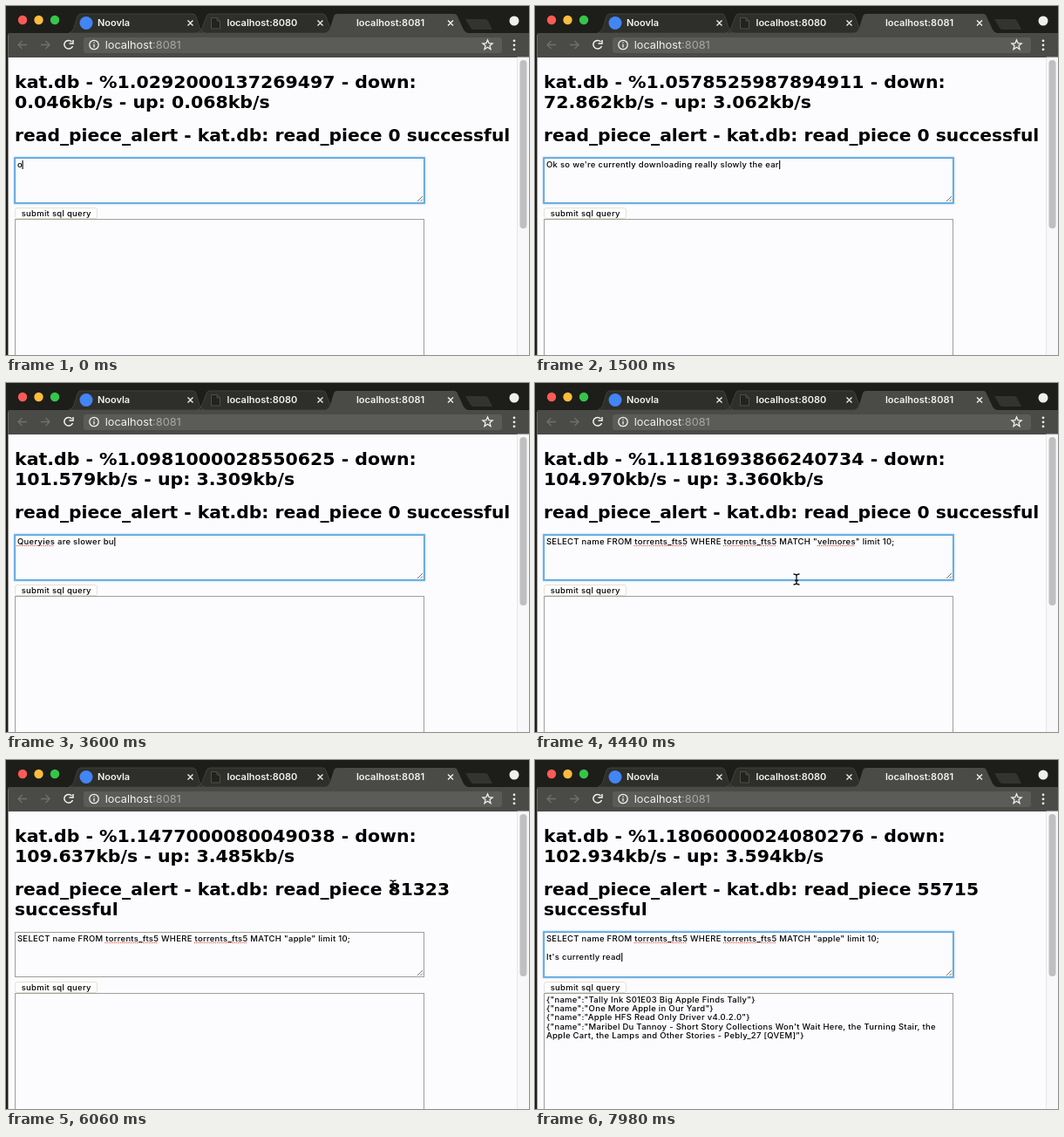
Recreate the animation shown at these times as an HTML page. Size 600 by 400 pixels, loop 8000 ms.

```html
<!DOCTYPE html>
<html lang="en">
<head>
<meta charset="utf-8">
<title>SQL over a partial download</title>
<style>
  html, body { margin: 0; width: 100%; height: 100%; overflow: hidden; background: #fcfbfe; }
  #stage { position: absolute; left: 0; top: 0; width: 600px; height: 400px; overflow: hidden; }
  svg, .layer { position: absolute; left: 0; top: 0; }
  svg text { font-family: Inter, Roboto, sans-serif; font-size: 10.1px; font-weight: 600; fill: #f4f4f2; }
  .wide { transform: scale(1.09, 1); transform-origin: 0 0; }
  h2, .small { position: absolute; margin: 0; left: 9.2px; white-space: pre; color: #000; }
  h2 { font: bold 18.8px/23px "DejaVu Sans", sans-serif; }
  #piece { top: 137px; font-size: 18.6px; }
  .small { font: 500 8.7px/10.2px Inter, Roboto, sans-serif; letter-spacing: .27px; }
  .box { position: absolute; left: 10px; width: 470px; box-sizing: border-box; background: #fcfbfe; border: 1px solid #a09f98; }
  #field { top: 174px; height: 52px; }
  #field.focus { border-color: #5ca3d8; box-shadow: 0 0 0 1px #7ab8e6, 0 0 2px 1px #a5d2f2; }
  #result { top: 244px; height: 200px; }
  #button { position: absolute; left: 10px; top: 231px; width: 95px; height: 13px; box-sizing: border-box;
            border: 1px solid #e3e2d4; border-radius: 3px; background: #fefefe; }
  .typo { text-decoration: underline dotted #d8452c 1.2px; text-underline-offset: 1px; text-decoration-skip-ink: none; }
  .picked { background: #a9d0f5; }
  .caret { display: inline-block; width: 1px; height: 10px; margin-right: -1px; background: #000; vertical-align: -2px; }
</style>
</head>
<body>
<div id="stage">
  <div class="layer" id="body">
    <div class="box" id="field"></div>
    <svg width="600" height="240" fill="none" stroke="#77766f"><path d="M472 224l6-6M475.500 224l2.500-2.500"/></svg>
    <div id="button"></div>
    <div class="box" id="result"></div>
    <div class="layer wide">
      <div class="small" id="typed" style="left:11.900px;top:177.200px"></div>
      <div class="small" style="left:16.200px;top:232.500px">submit sql query</div>
      <div class="small" id="rows" style="left:11.900px;top:247px"></div>
    </div>
  </div>
  <div class="layer wide">
    <h2 id="stats" style="top:76px"></h2>
    <h2 id="piece"></h2>
  </div>
  <svg width="600" height="400">
    <path fill="#1d1d1a" d="M0 0h600v33H0zM0 33h2.500v367H0z"/>
    <path fill="#2e2e2a" stroke="#4c4c46" stroke-width=".7" d="M72 31Q76 30 78 25L82 12Q83 9 86 9H214Q217 9 218 12L222 25Q224 30 228 31zM219 31Q223 30 225 25L230 12Q231 9 234 9H363Q366 9 367 12L372 25Q374 30 378 31z"/>
    <path fill="#33332f" d="M527 15h23q2 0 3 2l5 10h-22q-2 0-3-2z"/>
    <path fill="#4a4a47" d="M2.500 31H366Q370 30 372 25L376 12Q377 9 380 9H514Q517 9 518 12L524 25Q526 30 530 31H600V59H2.500z"/>
    <rect x="89" y="36" width="480" height="18" rx="3" fill="#5b5b58"/>
    <circle cx="19" cy="16" r="5.200" fill="#fb5b56"/>
    <circle cx="37.500" cy="16" r="5.200" fill="#fcbc3e"/>
    <circle cx="56" cy="16" r="5.200" fill="#35c649"/>
    <circle cx="92" cy="19.500" r="7.500" fill="#4285f4"/>
    <circle cx="583" cy="17" r="5.500" fill="#efefec"/>
    <path d="M235.500 13.500h6.500l3.500 3.500v9h-10zM242 13.500v3.500h3.500" fill="#22221f" stroke="#4f4f49"/>
    <g fill="none" stroke="#f1f1ee" stroke-width="1.300">
      <path d="M208.500 16.500l6 6m0-6l-6 6M357.500 16.500l6 6m0-6l-6 6M507 16.500l6 6m0-6l-6 6"/>
      <path d="M24 44.500H14m4.500-4.500l-4.500 4.500 4.500 4.500M40 44.500H50m-4.500-4.500l4.500 4.500-4.500 4.500" stroke="#6f6f6b"/>
      <path d="M75.500 41a5 4.800 0 1 0 1 5M77 39v4h-4.500" stroke-width="1.500"/>
      <circle cx="101" cy="44.500" r="5.200"/>
      <path d="M101 43.800v3.700M101 41.300v1.300"/>
      <path d="M552.500 39l1.600 3.700 4 .3-3.100 2.600 1 3.900-3.500-2.200-3.500 2.200 1-3.900-3.100-2.600 4-.3z"/>
    </g>
    <g fill="#f1f1ee"><circle cx="583" cy="39.800" r="1.400"/><circle cx="583" cy="44.800" r="1.400"/><circle cx="583" cy="49.800" r="1.400"/></g>
    <g transform="scale(1.090 1)">
      <text x="96.300" y="23">Noovla</text>
      <text x="232.600" y="23">localhost:8080</text>
      <text x="368.800" y="23">localhost:8081</text>
      <text x="104.300" y="49" style="font-size:11.700px;font-weight:400">localhost<tspan fill="#a9a9a5">:8081</tspan></text>
    </g>
    <path fill="#f8f7f9" stroke="#e6e5e8" d="M586.500 59H601V401H586.500z"/>
    <rect id="thumb" x="589.500" y="62" width="8" rx="4" fill="#c0bfc0"/>
    <g id="mouse">
      <path id="beam" fill="none" stroke="#111" stroke-width="1.300" d="M-3.500-6Q0-6 0-4Q0-6 3.500-6M0-4V4M-3.500 6Q0 6 0 4Q0 6 3.500 6M-2 1.500H2"/>
      <path id="arrow" fill="#111" stroke="#fff" stroke-width=".8" d="M0 0V12L3 9.500 5 13.500 7 12.500 5 8.500H9z"/>
    </g>
  </svg>
</div>
<script>
const $ = id => document.getElementById(id);
const LOOP = 8000, TICK = 30, REFRESH = 330;

const intro = "Ok so we're currently downloading really slowly the earlier kat.db file. We only have 1% of it so far";
const slow = 'Queryies are slower but still work';
const open = 'SELECT name FROM torrents_fts5 WHERE torrents_fts5 MATCH "', close = '" limit 10;';
const first = open + 'velmores' + close;
const second = open + 'apple' + close;
const note = second + "\n\nIt's currently reading";

// time, text, characters typed, text after the caret
const typing = [
  [0, 'o', 1], [60, intro, 0], [660, intro, 27], [2370, intro, 86], [2790, intro, intro.length],
  [2970, slow, 0], [3600, slow, 22], [3960, slow, slow.length],
  [4230, '', 0], [4290, first, first.length],
  [5250, open + 'apple', open.length, close], [5460, open + 'apple', open.length + 5, close],
  [7380, note, second.length], [7980, note, second.length + 21]
];
// time, percent, down, up
const stats = [
  [0, 1.0292000137269497, .046, .068], [480, 1.0394999757409096, 45.359, 2.943],
  [2190, 1.0711999610066414, 92.865, 3.149], [3450, 1.0981000028550625, 101.579, 3.309],
  [4920, 1.1278999969363213, 106.614, 3.385], [5910, 1.1477000080049038, 109.637, 3.485],
  [7830, 1.1806000024080276, 102.934, 3.594]
];
const pieces = [[0, 0], [5880, 81323], [7020, 55715]];
const path = [
  [4440, 300, 225], [4800, 341, 183], [5520, 341, 183], [5760, 57, 237], [5820, 57, 237],
  [6060, 444, 144], [6700, 444, 150], [7050, 430, 212], [7380, 430, 212]
];
const rows = `{"name":"Tally Ink S01E03 Big Apple Finds Tally"}
{"name":"One More Apple in Our Yard"}
{"name":"Apple HFS Read Only Driver v4.0.2.0"}
{"name":"Maribel Du Tannoy - Short Story Collections Won't Wait Here, the Turning Stair, the
Apple Cart, the Lamps and Other Stories - Pebly_27 [QVEM]"}`;

const within = (t, a, b) => t >= a && t < b;
const show = (el, on) => el.style.display = on ? '' : 'none';

function locate(table, t) {
  let i = table.length - 1;
  while (i > 0 && table[i][0] > t) i--;
  return [table[i], table[i + 1] || table[i]];
}
function mix(table, t, at = t) {
  const [a, b] = locate(table, at);
  const k = b === a ? 0 : Math.max(0, (t - a[0]) / (b[0] - a[0]));
  return a.map((v, i) => v + (b[i] - v) * k);
}
const mark = text => text.replace(/kat\.db|Queryies|torrents_fts5|velmores/g, '<span class="typo">$&</span>');

function drawText(t, caret) {
  const [a, b] = locate(typing, t);
  let n = a[2];
  if (b !== a && b[1] === a[1]) n += Math.floor((b[2] - n) * (t - a[0]) / (b[0] - a[0]) + 1e-6);
  let html = mark(a[1].slice(0, n)) + (caret ? '<span class="caret"></span>' : '') + mark(a[3] || '');
  if (within(t, 5160, 5250)) html = html.replace('"typo">velmores', '"typo picked">velmores');
  $('typed').innerHTML = html;
}

function drawStats(t) {
  const start = locate(stats, t)[0][0];
  const [, percent, down, up] = mix(stats, start + Math.floor((t - start) / REFRESH) * REFRESH, t);
  $('stats').textContent =
    `kat.db - %${percent.toFixed(16)} - down:\n${down.toFixed(3)}kb/s - up: ${up.toFixed(3)}kb/s`;
}

function drawMouse(t, visible) {
  show($('mouse'), visible);
  const [, x, y] = mix(path, t);
  $('mouse').setAttribute('transform', `translate(${x} ${y})`);
  const onButton = within(t, 5700, 5880);
  show($('arrow'), onButton);
  show($('beam'), !onButton);
}

function draw(t) {
  const mouse = within(t, 4440, 5250) || within(t, 5520, 7380);
  const focus = !within(t, 5790, 7080);
  const piece = locate(pieces, t)[0][1];
  drawText(t, focus && !mouse);
  drawStats(t);
  drawMouse(t, mouse);
  $('field').className = focus ? 'box focus' : 'box';
  $('piece').textContent = `read_piece_alert - kat.db: read_piece ${piece}${piece ? '\n' : ' '}successful`;
  $('body').style.transform = `translateY(${piece ? 23 : 0}px)`;
  $('thumb').setAttribute('height', piece ? 186 : 193);
  $('rows').textContent = t >= 6600 ? rows : '';
}

function frame() {
  draw(Math.floor(performance.now() % LOOP / TICK) * TICK);
  requestAnimationFrame(frame);
}
draw(0);
requestAnimationFrame(frame);
</script>
</body>
</html>
```
